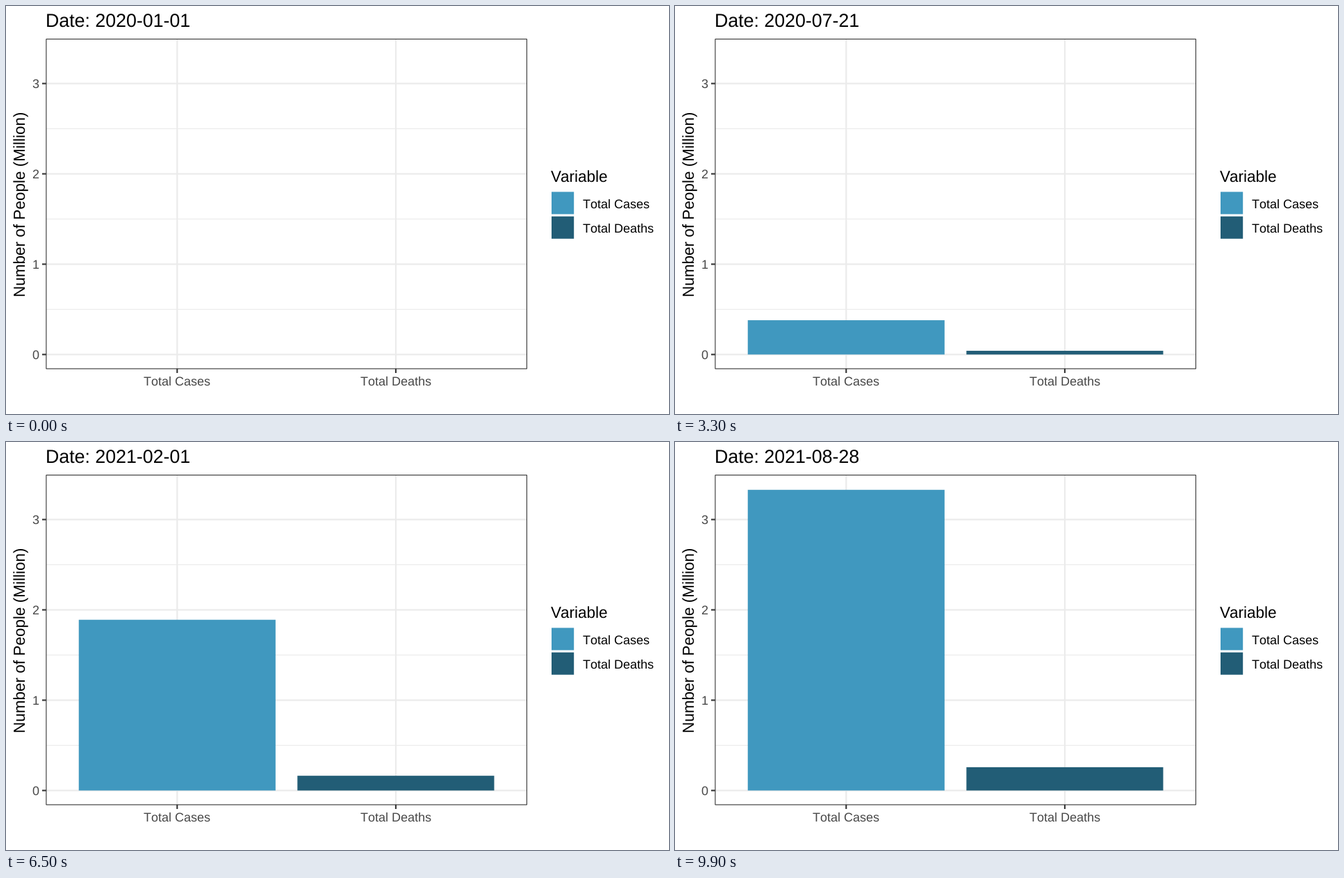
These frames come from a looping animation (954 by 587 pixels, 10 s). A matplotlib script:

```python
import numpy as np
import matplotlib.pyplot as plt
from matplotlib.animation import FuncAnimation
from matplotlib.patches import Rectangle

W, H, DPI = 954, 587, 64
FRAMES, DAYS = 100, 605
START = np.datetime64("2020-01-01")

plt.rcParams.update({
    "font.family": "Liberation Sans",
    "text.hinting": "none",
    "text.kerning_factor": 6,  # effectively disables kerning
})

CASES, DEATHS = "#4098BF", "#225D76"
DARK, GREY, GRID = "#333333", "#474747", "#EBEBEB"

# Panel geometry in pixels
LEFT, RIGHT, TOP, BOTTOM = 57.9, 749.4, 47.6, 521.9
Y0, UNIT = 501.4, 129.95
PITCH = 314.6
X = (246.3, 246.3 + PITCH)
BAR = 0.9 * PITCH

# Turning points of each curve: (day, thousands)
CASE_CURVE = ((95, 0), (131, 36), (166, 150), (213, 434), (278, 790),
              (330, 1085), (363, 1401), (403, 1930), (443, 2188),
              (534, 2472), (557, 2590), (580, 2890), (605, 3329))
DEATH_CURVE = ((95, 0), (135, 5), (182, 29), (278, 82), (363, 124),
               (411, 175), (456, 204), (534, 231), (605, 258))

fig = plt.figure(figsize=(W / DPI, H / DPI), dpi=DPI, facecolor="white")
ax = fig.add_axes([0, 0, 1, 1])
ax.set_xlim(0, W)
ax.set_ylim(H, 0)
ax.axis("off")


def pt(px):
    return px * 72 / DPI


def text(x, y, s, size, color="black", **kw):
    return ax.text(x, y, s, fontsize=pt(size), color=color, va="baseline", **kw)


def line(x, y, width, color, z):
    ax.plot(x, y, color=color, lw=pt(width), zorder=z,
            solid_capstyle="butt", snap=False)


def box(x, y, w, h, **style):
    style = {"lw": 0, "zorder": 3, "snap": False, **style}
    return ax.add_patch(Rectangle((x, y), w, h, **style))


def y_pos(value):
    return Y0 - UNIT * value


# Grid, ticks and tick labels
for v in range(4):
    y = y_pos(v)
    line((LEFT, RIGHT), (y, y), 2.1, GRID, 2)
    line((52, LEFT), (y, y), 2.1, DARK, 5)
    text(37.4, y + 6.6, str(v), 18, GREY)
    if v < 3:
        line((LEFT, RIGHT), (y_pos(v + 0.5),) * 2, 1.1, GRID, 1)
for x, name in zip(X, ("Total Cases", "Total Deaths")):
    line((x, x), (TOP, BOTTOM), 2.1, GRID, 2)
    line((x, x), (BOTTOM, 528), 2.1, DARK, 5)
    text(x, 546, name, 18, GREY, ha="center")

box(LEFT, TOP, RIGHT - LEFT, BOTTOM - TOP, fill=False, ec=DARK,
    lw=pt(1.1), zorder=4)
text(28, 284.5, "Number of People (Million)", 22.5, rotation=90,
     rotation_mode="anchor", ha="center")

# Legend
text(784, 253, "Variable", 22.5)
for y, name, color in ((267.4, "Total Cases", CASES),
                       (302.7, "Total Deaths", DEATHS)):
    box(785, y, 32.2, 32.1, fc=color)
    text(829.7, y + 23.4, name, 18)

title = text(57, 30.5, "", 26.8)
bars = [box(x - BAR / 2, Y0, BAR, 0, fc=c) for x, c in zip(X, (CASES, DEATHS))]


def update(n):
    step = DAYS / (FRAMES - 1)
    title.set_text(f"Date: {START + round(n * step)}")
    # The bars show the latest day that falls within the time step
    day = min(DAYS, int((n + 0.5) * step))
    for bar, curve in zip(bars, (CASE_CURVE, DEATH_CURVE)):
        value = np.interp(day, *zip(*curve)) / 1000
        bar.set_y(y_pos(value))
        bar.set_height(UNIT * value)
    return [title, *bars]


anim = FuncAnimation(fig, update, frames=FRAMES, interval=100, repeat=True,
                     repeat_delay=0, init_func=lambda: update(0), blit=False)
plt.show()
```
